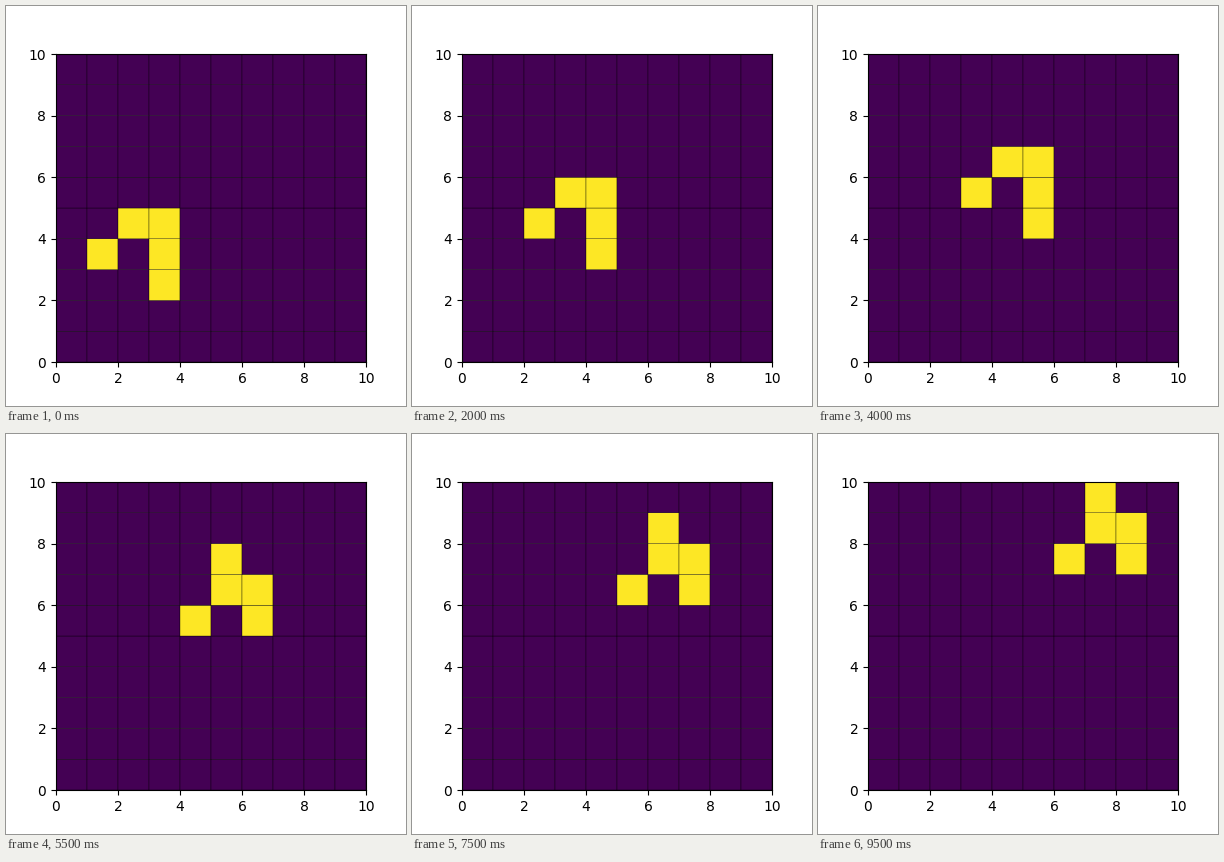
Animation of 400 by 400 pixels, one loop 10000 ms. Source, as a matplotlib script:

```python
import matplotlib.pyplot as plt
import numpy as np
from matplotlib.animation import FuncAnimation

SIZE = 10
STEPS = 20
GLIDER = [(1, 3), (2, 4), (3, 4), (3, 3), (3, 2)]


def evolve(grid):
    """One Game of Life generation with dead cells beyond the border."""
    padded = np.pad(grid, 1)
    neighbours = sum(
        padded[1 + dy:1 + dy + SIZE, 1 + dx:1 + dx + SIZE]
        for dy in (-1, 0, 1) for dx in (-1, 0, 1) if (dx, dy) != (0, 0)
    )
    return ((neighbours == 3) | ((grid == 1) & (neighbours == 2))).astype(int)


start = np.zeros((SIZE, SIZE), dtype=int)
for x, y in GLIDER:
    start[y, x] = 1

generations = [start]
while len(generations) < STEPS:
    generations.append(evolve(generations[-1]))

fig, ax = plt.subplots(figsize=(4, 4), dpi=100)
cells = ax.pcolor(start, cmap="viridis", vmin=0, vmax=1,
                  edgecolors="k", linewidths=0.25)


def update(step):
    cells.set_array(generations[step])
    return (cells,)


animation = FuncAnimation(fig, update, frames=STEPS, interval=500,
                          repeat=True, repeat_delay=0)
plt.show()
```
